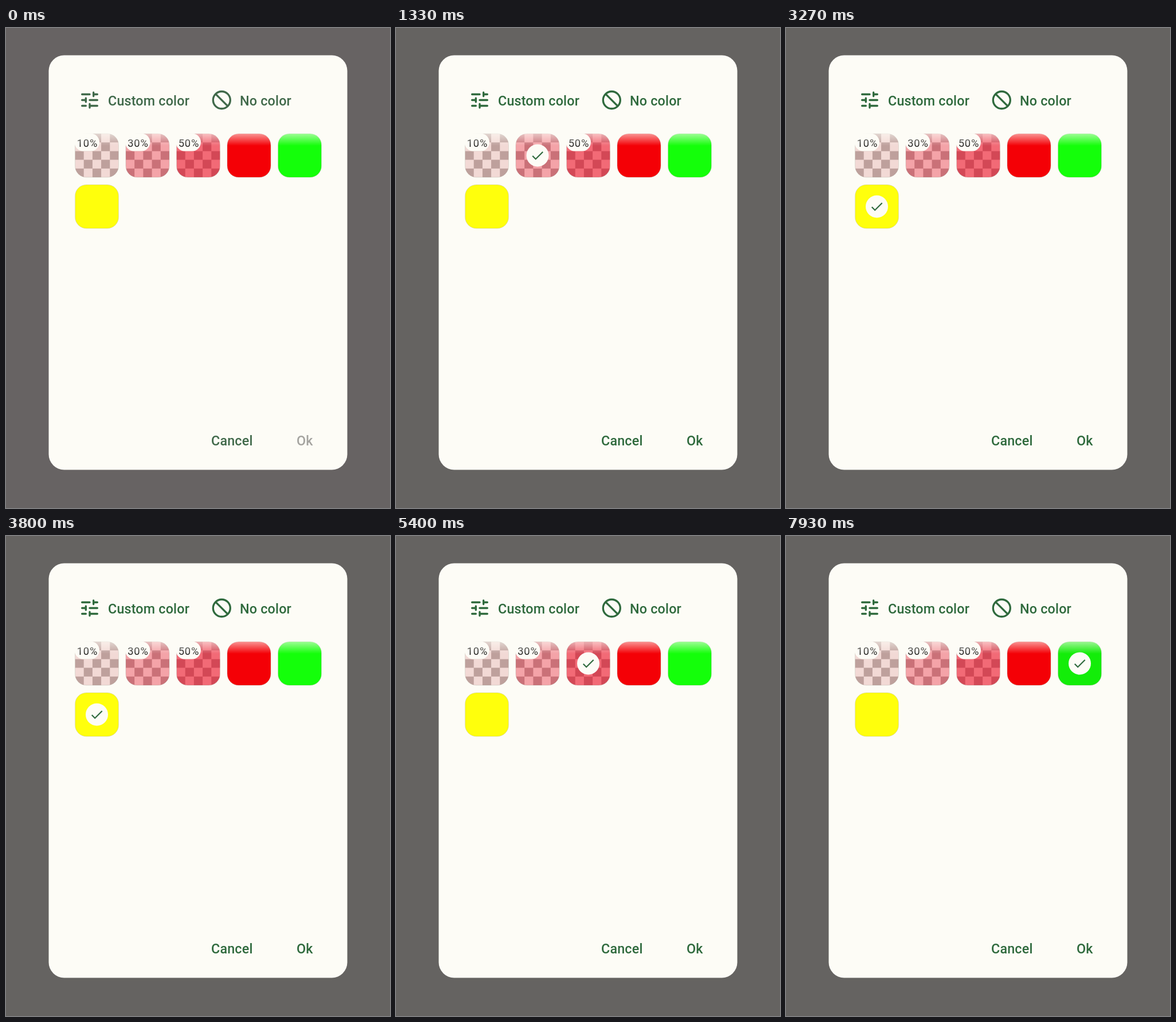
These frames come from a looping animation (670x836 px, 8000 ms). An HTML page:

```html
<!DOCTYPE html>
<html lang="en">
<head>
<meta charset="utf-8">
<title>Color picker</title>
<style>
  html, body { margin: 0; width: 100%; height: 100%; overflow: hidden; }
  svg { display: block; width: 100%; height: 100%; }
  text { font-family: Roboto, sans-serif; }
  .label { font-size: 23.33px; font-weight: 500; letter-spacing: .167px; fill: currentColor; }
  .badge { font-size: 18.33px; letter-spacing: .83px; fill: #20201e; text-anchor: middle; }
  .icon { fill: none; stroke: currentColor; stroke-width: 2; stroke-linecap: round; }
</style>
</head>
<body>
<svg id="stage" viewBox="0 0 670 836">
  <defs>
    <clipPath id="tileShape"><rect width="76" height="76" rx="20"/></clipPath>
    <linearGradient id="edge" x2="0" y2="1">
      <stop stop-color="#fdfcf6" stop-opacity=".62"/>
      <stop offset="1" stop-color="#fdfcf6" stop-opacity="0"/>
    </linearGradient>
  </defs>
  <rect id="backdrop" width="670" height="836"/>
  <rect x="74.5" y="47.5" width="521" height="722" rx="27" fill="#fdfcf6"/>
  <g class="icon" transform="translate(126 105.5) scale(1.667)">
    <path d="M4 6h8M16 4v4M16 6h4M4 12h4M8 10v4M12 12h8M4 18h4M12 16v4M12 18h8"/>
  </g>
  <g class="icon" transform="translate(356.3 105.5) scale(1.667)">
    <circle cx="12" cy="12" r="9"/><path d="M5.6 5.6L18.4 18.4" stroke-linecap="butt"/>
  </g>
  <text class="label" x="178" y="134.5">Custom color</text>
  <text class="label" x="408" y="134.5">No color</text>
  <text class="label" x="358" y="726.5">Cancel</text>
  <text class="label" id="ok" x="507" y="726.5">Ok</text>
  <g id="tiles"></g>
  <rect x="116" y="183" width="440" height="22" fill="url(#edge)"/>
</svg>
<script>
const LOOP = 8000, SIZE = 76, CELL = SIZE / 5;
const stage = document.getElementById('stage');
const backdrop = document.getElementById('backdrop');
const ok = document.getElementById('ok');

const swatches = [
  { label: '10%', fill: '#f2d9d5', dark: '#bea09c' },
  { label: '30%', fill: '#f4a3a8', dark: '#ca7178' },
  { label: '50%', fill: '#f26a76', dark: '#d34856' },
  { fill: '#f40006' },
  { fill: '#14ff0a' },
  { fill: '#ffff0c' },
];

// Each tap selects one swatch.
const taps = [
  { at: 530, tile: 1 }, { at: 1870, tile: 3 }, { at: 3270, tile: 5 },
  { at: 4530, tile: 2 }, { at: 7600, tile: 4 },
];

function checker(dark) {
  let d = '';
  for (let i = 0; i < 25; i += 2)
    d += `M${i % 5 * CELL} ${Math.floor(i / 5) * CELL}h${CELL}v${CELL}h${-CELL}z`;
  return `<path d="${d}" fill="${dark}"/>`;
}

function tileMarkup({ label, fill, dark }, i) {
  const x = 120.5 + i % 5 * 88.5, y = 184 + Math.floor(i / 5) * 89;
  return `<g transform="translate(${x} ${y})">
    <g clip-path="url(#tileShape)">
      <rect width="76" height="76" fill="${fill}"/>
      ${dark ? checker(dark) : ''}
      <circle class="ripple" cx="38" cy="38"/>
    </g>
    <rect width="76" height="76" rx="20" fill="none" stroke="#a8a69c" stroke-opacity=".35"/>
    ${label ? `<g class="tag">
      <rect x="-1" y="-.5" width="43.5" height="31" rx="15.5" fill="#fdfcf6"/>
      <text class="badge" x="21.5" y="22.5">${label}</text></g>` : ''}
    <g class="mark" transform="translate(38 38)">
      <circle r="19.5" fill="#fdfcf6"/>
      <path transform="scale(1.11) translate(-12 -12)" fill="currentColor"
        d="M9 16.17L4.83 12l-1.42 1.41L9 19 21 7l-1.41-1.41z"/>
    </g>
  </g>`;
}

const group = document.getElementById('tiles');
group.innerHTML = swatches.map(tileMarkup).join('');
const tiles = [...group.children].map(el => ({
  ripple: el.querySelector('.ripple'),
  tag: el.querySelector('.tag'),
  mark: el.querySelector('.mark'),
}));

const clamp = v => Math.min(1, Math.max(0, v));
const ease = v => v * v * (3 - 2 * v);
const show = (el, on) => el && el.setAttribute('visibility', on ? 'visible' : 'hidden');

function draw(t) {
  const tap = taps.filter(p => p.at <= t).pop();
  const settled = t >= 130;
  stage.style.color = settled ? '#2f6a3d' : '#40694a';
  backdrop.setAttribute('fill', settled ? '#656361' : '#676363');
  ok.style.fill = tap ? 'currentColor' : '#a5a4a0';

  tiles.forEach(({ ripple, tag, mark }, i) => {
    const selected = Boolean(tap) && tap.tile === i;
    show(mark, selected);
    show(tag, !selected);
    const age = selected ? t - tap.at : 0;
    const alpha = .24 * Math.min(clamp(age / 75), 1 - clamp((age - 225) / 150));
    ripple.setAttribute('r', 23 + 48 * ease(clamp(age / 225)));
    ripple.setAttribute('fill-opacity', alpha);
  });
}

const start = performance.now();
function frame() {
  draw((performance.now() - start) % LOOP);
  requestAnimationFrame(frame);
}
frame();
</script>
</body>
</html>
```
